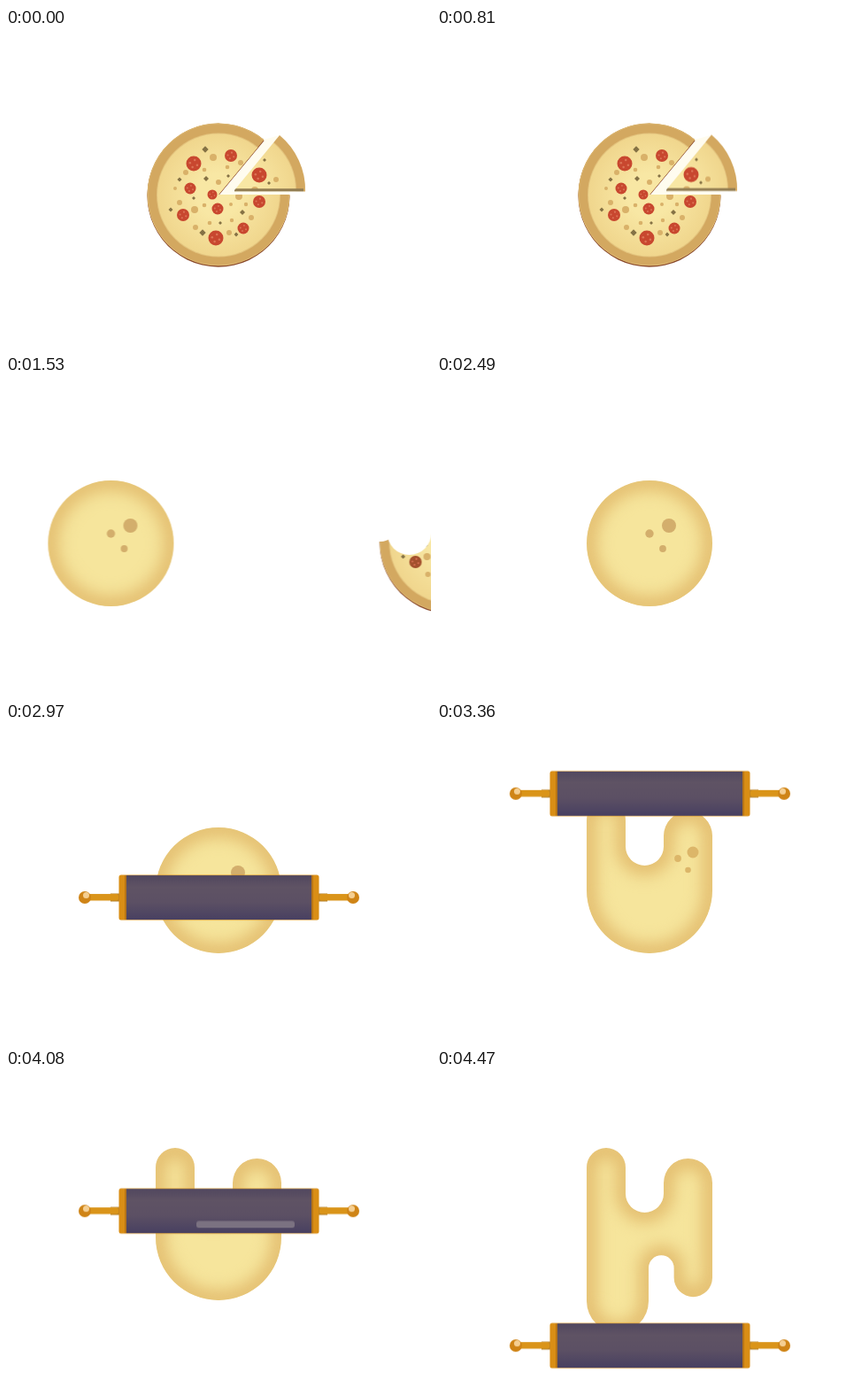
Recreate the animation shown at these times as an HTML page. Size 480 px wide and 360 px high, loop 4.5 s.

```html
<!DOCTYPE html>
<html lang="en">
<head>
<meta charset="utf-8">
<title>Pizza dough</title>
<style>
  html, body { margin: 0; width: 100%; height: 100%; overflow: hidden; background: #fff; }
  svg { display: block; width: 480px; height: 360px; }

  .anim { animation: 4.5s linear infinite; }
  .roll { animation-name: roll; }
  .slice { animation-name: slice; }
  .exit { animation-name: exit; }
  .enter { animation-name: enter; }
  .step { animation-timing-function: step-end; }
  .bite1 { animation-name: bite1; }
  .bite2 { animation-name: bite2; }
  .bite3 { animation-name: bite3; }
  .before { animation-name: before; }
  .after { animation-name: after; }
  .sauce { animation-name: sauce; }

  /* roller centre: up from below the stage, then down again */
  @keyframes roll {
    0%, 50% { transform: translateY(540px); animation-timing-function: cubic-bezier(.46, 0, .4, 1); }
    78.02% { transform: translateY(74px); animation-timing-function: cubic-bezier(.778, 0, .569, .946); }
    100% { transform: translateY(313.4px); }
  }
  @keyframes slice {
    0% { transform: none; }
    18%, 100% { transform: translate(1px, -.5px); }
  }
  @keyframes exit {
    0%, 26.76% { transform: none; animation-timing-function: cubic-bezier(.46, 0, .4, 1); }
    40.18%, 100% { transform: translateX(384px); }
  }
  @keyframes enter {
    0%, 26.76% { transform: translateX(-384px); animation-timing-function: cubic-bezier(.46, 0, .4, 1); }
    40.18%, 100% { transform: none; }
  }
  @keyframes bite1 { 0% { opacity: 0; } 19.33%, 100% { opacity: 1; } }
  @keyframes bite2 { 0% { opacity: 0; } 22%, 100% { opacity: 1; } }
  @keyframes bite3 { 0% { opacity: 0; } 24.66%, 100% { opacity: 1; } }
  @keyframes before { 0% { opacity: 1; } 78.02%, 100% { opacity: 0; } }
  @keyframes after { 0% { opacity: 0; } 78.02%, 100% { opacity: 1; } }
  @keyframes sauce { 0% { color: #c8472f; } 24.66%, 100% { color: #a3502d; } }
</style>
</head>
<body>
<svg viewBox="0 0 480 360">
  <defs>
    <radialGradient id="cheese">
      <stop offset=".35" stop-color="#f8e7a4"/>
      <stop offset="1" stop-color="#f0d68d"/>
    </radialGradient>
    <linearGradient id="barrel" x2="0" y2="1">
      <stop offset="0" stop-color="#51475f"/>
      <stop offset=".25" stop-color="#5f5364"/>
      <stop offset=".6" stop-color="#5c5064"/>
      <stop offset="1" stop-color="#484061"/>
    </linearGradient>
    <filter id="soft" filterUnits="userSpaceOnUse" x="110" y="40" width="260" height="310" color-interpolation-filters="sRGB">
      <feGaussianBlur stdDeviation="9"/>
    </filter>

    <path id="body" d="M240 188H320.5A80.5 80.5 0 1 1 291.5 126Z"/>
    <path id="wedge" d="M258 183L309 121A80 80 0 0 1 338 184.500H258Z"/>
    <clipPath id="inBody"><use href="#body"/></clipPath>
    <clipPath id="inWedge"><use href="#wedge"/></clipPath>
    <g id="toppings"></g>

    <circle id="ball" cx="240" cy="190" r="71"/>
    <path id="cup" d="M169 190V111A22 22 0 0 1 213 111V140.500A21.500 21.500 0 0 0 256 140.500V128.500A27.500 27.500 0 0 1 311 128.500V190A71 71 0 0 1 169 190Z"/>
    <path id="letter" d="M169 262V111A22 22 0 0 1 213 111V140.500A21.500 21.500 0 0 0 256 140.500V128.500A27.500 27.500 0 0 1 311 128.500V235.500A21.700 21.700 0 0 1 267.600 235.500V224.500A14.300 14.300 0 0 0 239 224.500V262A35 35 0 0 1 169 262Z"/>
    <clipPath id="inBall"><use href="#ball"/></clipPath>
    <clipPath id="inCup"><use href="#cup"/></clipPath>
    <clipPath id="inLetter"><use href="#letter"/></clipPath>

    <clipPath id="above"><rect class="anim roll" y="-600" width="480" height="600"/></clipPath>
    <clipPath id="below"><rect class="anim roll" width="480" height="600"/></clipPath>
    <clipPath id="inBarrel"><rect x="136" y="-25" width="209" height="50"/></clipPath>

    <mask id="bites" maskUnits="userSpaceOnUse" x="140" y="90" width="220" height="200">
      <rect x="140" y="90" width="220" height="200" fill="#fff"/>
      <g class="anim step bite1">
        <rect x="264" y="95" width="90" height="82"/>
        <circle cx="286" cy="176" r="25"/>
        <circle cx="326" cy="172" r="22"/>
      </g>
      <g class="anim step bite2">
        <rect x="214" y="95" width="52" height="76"/>
        <circle cx="241" cy="171" r="25"/>
      </g>
      <g class="anim step bite3">
        <rect x="145" y="95" width="71" height="78"/>
        <circle cx="193" cy="178" r="25"/>
        <circle cx="160" cy="168" r="20"/>
      </g>
    </mask>
  </defs>

  <g class="anim exit">
    <g mask="url(#bites)">
      <g class="anim step sauce">
        <path d="M242 188L291 126L309 121L258 183L320 185V188Z" fill="#fffcef"/>
        <use href="#body" y="1.300" fill="#8a4a2c"/>
        <g clip-path="url(#inBody)">
          <circle cx="240" cy="188" r="81" fill="#d3a860"/>
          <circle cx="240" cy="188" r="80" fill="none" stroke="#dcb772"/>
          <circle cx="240" cy="188.500" r="70" fill="#e3c37d"/>
          <circle cx="240" cy="188.500" r="69" fill="url(#cheese)"/>
          <use href="#toppings"/>
        </g>
        <g class="anim slice">
          <g clip-path="url(#inWedge)">
            <circle cx="258" cy="183" r="81" fill="#d3a860"/>
            <circle cx="258" cy="183" r="70" fill="#e3c37d"/>
            <circle cx="258" cy="183" r="69" fill="url(#cheese)"/>
            <use href="#toppings"/>
            <path d="M257 183H336" stroke="#927d52" stroke-width="3.400"/>
          </g>
        </g>
      </g>
    </g>
  </g>

  <g clip-path="url(#above)">
    <g class="anim step before">
      <g class="anim enter">
        <g clip-path="url(#inBall)">
          <use href="#ball" fill="#f6e59c"/>
          <use href="#ball" fill="none" stroke="#e3bd6f" stroke-width="22" filter="url(#soft)"/>
        </g>
        <g fill="#d3ae6c">
          <circle cx="262" cy="170" r="8"/>
          <circle cx="240" cy="179" r="4.700"/>
          <circle cx="255" cy="196" r="3.900"/>
        </g>
      </g>
    </g>
    <g class="anim step after">
      <g clip-path="url(#inLetter)">
        <use href="#letter" fill="#f6e59c"/>
        <use href="#letter" fill="none" stroke="#e3bd6f" stroke-width="22" filter="url(#soft)"/>
      </g>
    </g>
  </g>

  <g clip-path="url(#below)">
    <g clip-path="url(#inCup)">
      <use href="#cup" fill="#f6e59c"/>
      <use href="#cup" fill="none" stroke="#e3bd6f" stroke-width="22" filter="url(#soft)"/>
    </g>
    <g fill="#dcb669">
      <circle cx="289" cy="147" r="6.500"/>
      <circle cx="272" cy="154" r="3.900"/>
      <circle cx="283.500" cy="167" r="3.300"/>
    </g>
  </g>

  <g class="anim roll">
    <g id="handle">
      <rect x="118" y="-4.500" width="11" height="9" fill="#b27e28"/>
      <rect x="89" y="-4" width="38" height="7.500" rx="2" fill="#da9419"/>
      <circle cx="89" r="7" fill="#cf8416"/>
      <circle cx="90.500" cy="-2.500" r="3.500" fill="#f5cf92"/>
    </g>
    <use href="#handle" transform="translate(481) scale(-1 1)"/>
    <rect x="127.500" y="-25.500" width="226" height="51" rx="2.500" fill="#d98e15"/>
    <path d="M135 -25V25M346 -25V25" stroke="#b97616" stroke-width="2"/>
    <rect x="136" y="-25" width="209" height="50" fill="url(#barrel)"/>
    <g clip-path="url(#inBarrel)">
      <!-- shine turns with the barrel: same travel again, on top of the roller's own -->
      <g class="anim roll" fill="#7b7281">
        <rect x="215" y="-149" width="111" height="8" rx="3"/>
        <rect x="215" y="-274" width="111" height="8" rx="3"/>
      </g>
    </g>
  </g>
</svg>
<script>
  const salami = [[212, 153, 8.5], [254, 144, 7], [286, 166, 8.5], [208, 181, 6.5], [233, 188, 5.5],
    [239, 204, 6.5], [286, 196, 7], [200, 211, 7], [268, 226, 6.5], [237, 237, 8.5]];
  const spots = [[234, 146, 4], [203, 163, 3], [191, 181, 2], [196, 197, 3], [213, 205, 4], [224, 160, 2.3],
    [250, 157, 2.3], [265, 152, 3], [240, 174, 3], [224, 200, 2.3], [230, 220, 2.3], [255, 217, 2.2],
    [254, 199, 2], [271, 199, 2.2], [277, 214, 3], [252, 231, 3], [214, 225, 3], [263, 190, 4],
    [305, 171, 3], [281, 183, 4]];
  const herbs = [[225, 137, 3.7], [196, 171, 2.6], [226, 170, 3], [212, 192, 2], [186, 205, 2.5], [222, 231, 3.7],
    [242, 220, 2], [267, 208, 3], [260, 233, 2.4], [251, 167, 2], [292, 149, 2], [297, 175, 2]];

  const dot = (x, y, r, fill) => `<circle cx="${x}" cy="${y}" r="${r}" fill="${fill}"/>`;
  const disc = ([x, y, r]) => dot(x, y, r, 'currentColor') +
    [0.4, 1.9, 3.3, 5].map(a =>
      dot(x + r * .5 * Math.cos(a), y + r * .5 * Math.sin(a), r * .15, '#dc7456')).join('');
  const leaf = ([x, y, r]) => `<path d="M${x - r} ${y}l${r} ${-r}l${r} ${r}l${-r} ${r}Z" fill="#857245"/>`;

  document.getElementById('toppings').innerHTML =
    spots.map(s => dot(...s, '#d9b169')).join('') + herbs.map(leaf).join('') + salami.map(disc).join('');
</script>
</body>
</html>
```
